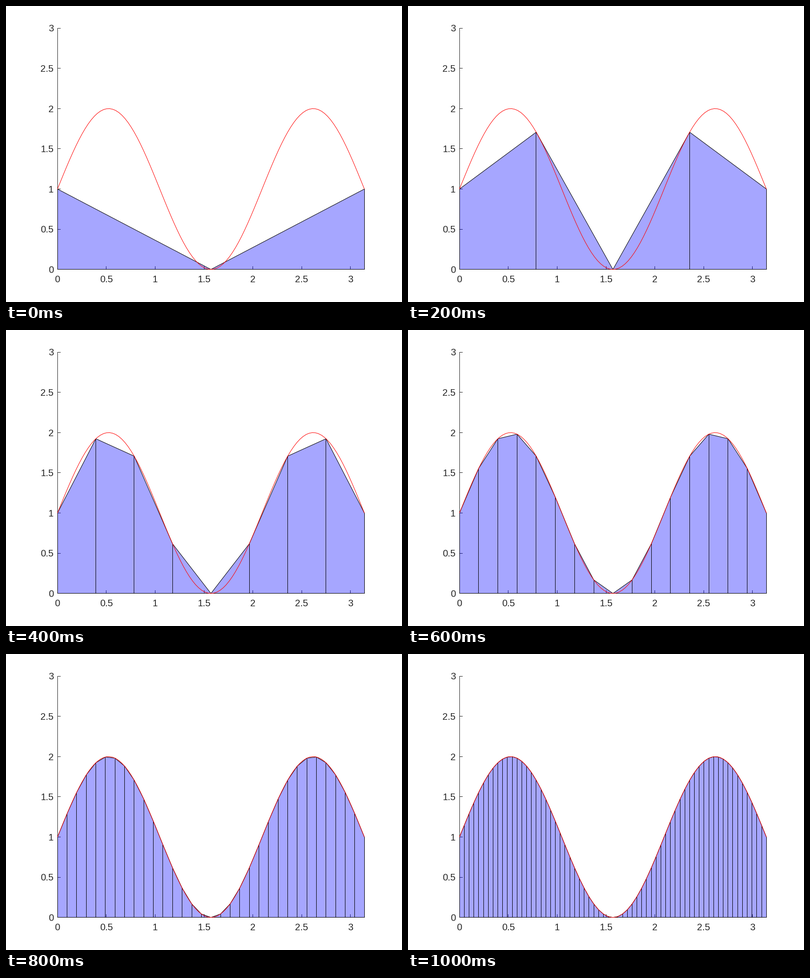
A matplotlib script that plays this animation: 840 by 630 pixels, repeating every 1200 ms.

```python
import numpy as np
import matplotlib.pyplot as plt
from matplotlib.animation import FuncAnimation

WIDTH, HEIGHT, DPI = 840, 630, 100
LEFT, BASE = 0.13 * WIDTH, 0.89 * HEIGHT
X_UNIT, Y_UNIT = 0.775 * WIDTH / np.pi, 0.815 * HEIGHT / 3
PIXEL = 72 / DPI
TICK = 6.5
INK = "#262626"

plt.rcParams["path.snap"] = False
plt.rcParams["font.family"] = "Liberation Sans"


def f(x):
    return 1 + np.sin(3 * x)


def px(x):
    return LEFT + X_UNIT * np.asarray(x)


def py(y):
    return BASE - Y_UNIT * np.asarray(y)


def crisp(v):
    """Centre a coordinate on its pixel so straight lines stay sharp."""
    return np.floor(v) + 0.5


fig = plt.figure(figsize=(WIDTH / DPI, HEIGHT / DPI), dpi=DPI, facecolor="white")
ax = fig.add_axes([0, 0, 1, 1])
ax.set_xlim(0, WIDTH)
ax.set_ylim(HEIGHT, 0)
ax.axis("off")


def stroke(xs, ys, color, zorder):
    return ax.plot(xs, ys, color=color, lw=PIXEL, zorder=zorder,
                   solid_capstyle="butt")[0]


def label(x, y, value, align):
    ax.text(x, y, f"{value:g}", ha=align, va="baseline", color=INK,
            fontsize=20 * PIXEL)


left, right = crisp(px(0)), crisp(px(np.pi))
bottom, top = crisp(py(0)), crisp(py(3))

# Axes with inward ticks
stroke([left, left], [top - 0.5, bottom + 0.5], INK, 1)
stroke([left - 0.5, right + 0.5], [bottom, bottom], INK, 1)
for value in np.arange(0, 3.5, 0.5):
    x, y = crisp(px(value)), crisp(py(value))
    stroke([x, x], [bottom, bottom - TICK], INK, 1)
    stroke([left, left + TICK], [y, y], INK, 1)
    label(px(value), 588, value, "center")
    label(101, py(value) + 7.2, value, "right")

# Trapezoids: translucent area, sloping tops and upright sides
area, = ax.fill([0, 0, 0], [0, 0, 0], color="blue", alpha=0.35, lw=0, zorder=2)
tops = stroke([], [], "black", 3)
sides = stroke([], [], "black", 3)
stroke([left - 0.5, right + 0.5], [bottom, bottom], "black", 3)

curve_x = np.linspace(0, np.pi, 101)
stroke(px(curve_x), py(f(curve_x)), "red", 4)


def update(step):
    nodes = np.linspace(0, np.pi, 2 ** (step + 1) + 1)
    xs, ys = px(nodes), py(f(nodes))
    area.set_xy(np.column_stack([np.r_[xs, xs[-1], xs[0]],
                                 np.r_[ys, BASE, BASE]]))
    tops.set_data(xs, ys)
    gap = np.full_like(xs, np.nan)
    side_x = np.column_stack([crisp(xs), crisp(xs), gap]).ravel()
    side_y = np.column_stack([ys, np.full_like(ys, bottom), gap]).ravel()
    sides.set_data(side_x, side_y)
    return area, tops, sides


anim = FuncAnimation(fig, update, frames=6, interval=200, repeat=True,
                     repeat_delay=0)
plt.show()
```
